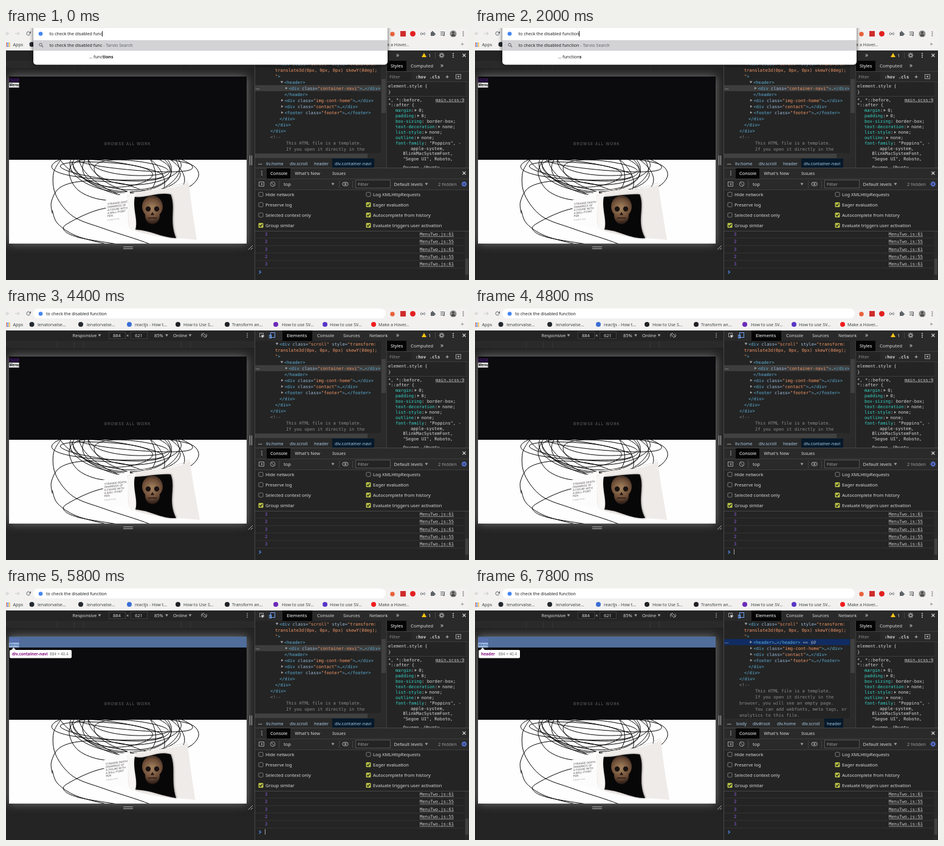
An HTML page with a canvas that plays this animation: 762 px wide and 415 px high, repeating every 8000 ms.

```html
<!DOCTYPE html>
<html lang="en">
<head>
<meta charset="utf-8">
<title>Browser session</title>
<style>
html, body { margin: 0; width: 100%; height: 100%; overflow: hidden; background: #242424; }
canvas { display: block; width: 762px; height: 415px; }
</style>
</head>
<body>
<canvas id="stage" width="762" height="415"></canvas>
<script>
const c = document.getElementById('stage').getContext('2d');
const UI = '"Noto Sans", "Open Sans", sans-serif';
const MONO = '"DejaVu Sans Mono", monospace';
const LOOP = 8000, STEP = 200;
const CLOSE = 4400, EXPAND = 6000, COLLAPSE = 7400;
const PALE = '#d8d8d8', GREY = '#9c9c9c', TAG = '#5db0d7';
const BACK = '#242424', BAR = '#2a2a2a', EDGE = '#3d3d3d', TRACK = '#2b2b2b', THUMB = '#414141';

// ---- helpers ----
function rect(x, y, w, h, color) { c.fillStyle = color; c.fillRect(x, y, w, h); }

function round(x, y, w, h, r, color) {
  c.fillStyle = color;
  c.beginPath(); c.roundRect(x, y, w, h, r); c.fill();
}

function frame(x, y, w, h, color) {
  c.strokeStyle = color; c.lineWidth = 1;
  c.strokeRect(x + .5, y + .5, w - 1, h - 1);
}

function disc(x, y, r, color) {
  c.fillStyle = color;
  c.beginPath(); c.arc(x, y, r, 0, 7); c.fill();
}

function ring(x, y, r, color, from = 0, to = 6.3) {
  c.strokeStyle = color; c.lineWidth = 1;
  c.beginPath(); c.arc(x, y, r, from, to); c.stroke();
}

function line(color, width, ...p) {
  c.strokeStyle = color; c.lineWidth = width;
  c.beginPath(); c.moveTo(p[0], p[1]);
  for (let i = 2; i < p.length; i += 2) c.lineTo(p[i], p[i + 1]);
  c.stroke();
}

function poly(color, ...p) {
  c.fillStyle = color;
  c.beginPath(); c.moveTo(p[0], p[1]);
  for (let i = 2; i < p.length; i += 2) c.lineTo(p[i], p[i + 1]);
  c.fill();
}

// y is the middle of the capital letters; returns the right end
function text(s, x, y, color = PALE, size = 7.5, font = UI, weight = 400) {
  c.font = `${weight} ${size}px ${font}`;
  c.fillStyle = color;
  c.fillText(s, x, y + size * .36);
  return x + c.measureText(s).width;
}

const mono = (s, x, y, color = PALE, weight) => text(s, x, y, color, 7.17, MONO, weight);

function link(s, x, y) {
  const end = mono(s, x, y, '#cccccc');
  rect(x, y + 3.6, end - x, .8, '#aaaaaa');
}

function down(x, y, color = GREY, r = 2.4) { poly(color, x - r, y - r * .7, x + r, y - r * .7, x, y + r * .9); }
function right(x, y, color = GREY, r = 2.2) { poly(color, x - r * .7, y - r, x + r * .9, y, x - r * .7, y + r); }
function dots(x, y, color) { for (const d of [-3, 0, 3]) disc(x, y + d, .9, color); }
function cross(x, y) {
  line(PALE, 1.1, x - 2.5, y - 2.5, x + 2.5, y + 2.5);
  line(PALE, 1.1, x + 2.5, y - 2.5, x - 2.5, y + 2.5);
}

function gear(x, y, color) {
  for (let i = 0; i < 8; i++) {
    const a = i * Math.PI / 4;
    line(color, 1.4, x, y, x + 4.5 * Math.cos(a), y + 4.5 * Math.sin(a));
  }
  disc(x, y, 3, color);
  disc(x, y, 1.6, BAR);
}

function spline(p) {
  const n = p.length / 2;
  const at = i => { const k = 2 * Math.max(0, Math.min(n - 1, i)); return [p[k], p[k + 1]]; };
  c.beginPath(); c.moveTo(p[0], p[1]);
  for (let i = 0; i < n - 1; i++) {
    const [a, b, d, e] = [at(i - 1), at(i), at(i + 1), at(i + 2)];
    c.bezierCurveTo(b[0] + (d[0] - a[0]) / 6, b[1] + (d[1] - a[1]) / 6,
      d[0] - (e[0] - b[0]) / 6, d[1] - (e[1] - b[1]) / 6, d[0], d[1]);
  }
  c.stroke();
}

// ---- previewed page ----
const sweeps = [
  [112,217, 104,240, 120,268, 160,283, 215,280, 262,262, 285,238, 280,217],
  [76,305, 75,285, 90,262, 130,252, 190,256, 235,270, 265,266, 300,262, 317,243, 305,225, 260,215],
  [76,300, 85,322, 115,342, 165,356],
  [205,290, 150,300, 105,320, 95,332, 120,345, 190,357],
  [90,217, 78,240, 82,275, 110,310, 160,330, 215,348, 240,357]
];

// one long pen line of drifting ovals, with a few wide sweeps
function scribble() {
  c.strokeStyle = '#000'; c.lineWidth = 1;
  c.beginPath();
  for (let a = 0; a < 72; a += .08) {
    const x = 192 + 20 * Math.sin(a * .17) + (78 + 20 * Math.sin(a * .29 + 1)) * Math.cos(a);
    const y = 229 + 10 * Math.sin(a * .23) + (31 + 18 * Math.sin(a * .37)) * Math.sin(a + .3);
    c.lineTo(x, y);
  }
  c.stroke();
  sweeps.forEach(spline);
}

// time, top right x and y, bottom right x, caption x, caption tilt
const poses = [
  [0, 301, 254, 314, 167, -.12],
  [2000, 302, 257, 316, 163, -.1],
  [3600, 309, 250, 327, 165, -.06],
  [4800, 301, 252, 316, 161, -.12],
  [5400, 297, 258, 309, 163, -.15],
  [6600, 304, 250, 319, 167, -.1],
  [7800, 306, 250, 320, 162, -.1]
];

function pose(t) {
  let i = 0;
  while (i < poses.length - 2 && t >= poses[i + 1][0]) i++;
  const a = poses[i], b = poses[i + 1];
  const u = Math.min(1, (t - a[0]) / (b[0] - a[0])), e = u * u * (3 - 2 * u);
  return a.map((v, k) => v + (b[k] - v) * e);
}

function poster(t) {
  const [, rx, ry, bx, tx, tilt] = pose(t);
  const w = 3 * Math.sin(t / 420);
  poly('#fdfcfc', tx - 4, 284, 204, 268, 204, 331, tx, 321);

  c.save();
  c.translate(tx, 290); c.rotate(tilt); c.transform(1, 0, -.12, 1, 0, 0);
  ['STRANGE DEATH', 'DRAWINGS OF', 'A FIGURE WITH', 'A BALL-POINT', 'PEN'].forEach(
    (s, i) => text(s, 0, i * 4.9, '#4b4849', 4.4, 'Inter, sans-serif'));
  text('A study in lines', 0, 26, '#8b8888', 2.8);
  c.restore();

  c.fillStyle = '#efebe9';
  c.beginPath(); c.moveTo(199, 276);
  c.bezierCurveTo(228, 262 + w, 268, 270 - w, rx, ry);
  c.bezierCurveTo(rx + 3, 284, bx - 5, 318, bx, 349);
  c.bezierCurveTo(286, 345, 238, 347, 203, 330);
  c.bezierCurveTo(198, 315, 203, 292, 199, 276);
  c.fill();
  poly('#f8f6f5', 200, 277, 213, 271, 214, 334, 203, 330);
  c.strokeStyle = '#d6d3d2'; c.lineWidth = .8;
  c.beginPath(); c.moveTo(180, 275);
  c.bezierCurveTo(218, 262 + w, 268, 268 - w, rx - 1, ry - 2); c.stroke();

  c.save();
  c.shadowColor = '#8d8784'; c.shadowBlur = 3; c.shadowOffsetX = 1;
  c.fillStyle = '#080708';
  c.beginPath(); c.moveTo(212, 278);
  c.bezierCurveTo(229, 281 + w, 248, 270 - w, 271, 274);
  c.bezierCurveTo(280, 296, 268 + w, 318, 280, 346);
  c.bezierCurveTo(255, 345 - w, 238, 333, 213, 332);
  c.bezierCurveTo(218, 317, 208, 298, 212, 278);
  c.fill();
  c.restore();

  const g = c.createRadialGradient(240, 296, 3, 240, 298, 24);
  g.addColorStop(0, '#9a7a58'); g.addColorStop(.6, '#6c4c36'); g.addColorStop(1, '#2b1d17');
  c.fillStyle = g;
  c.beginPath(); c.ellipse(241, 294, 17, 18, 0, 0, 7); c.fill();
  c.beginPath(); c.ellipse(241, 309, 12, 14, 0, 0, 7); c.fill();
  disc(234, 298, 4.2, '#1b1211'); disc(248, 298, 4.2, '#1b1211');
  poly('#231614', 241, 303, 244, 308, 238, 308);
  rect(234, 312, 14, 1.5, '#2a1b16');
}

function tip(x, y, w, name, size, nameX, sizeX) {
  c.save();
  c.shadowColor = '#0006'; c.shadowBlur = 3;
  round(x, y, w, 13.5, 2, '#fff');
  c.restore();
  text(name, nameX, y + 7, '#881280', 6.5, UI, 700);
  text(size, sizeX, y + 7, '#6b6b6b', 6.4);
}

function page(t) {
  rect(0, 37, 410, 378, BACK);
  rect(0, 54, 410, 12, BAR);
  for (const x of [84, 112, 127, 288, 303]) rect(x, 55, 1, 11, '#363636');
  rect(0, 66, 410, 1, '#1d1d1d');
  c.save();
  c.shadowColor = '#767676'; c.shadowBlur = 14;
  rect(5, 80, 391, 275, '#0b0a0c');
  c.restore();

  c.save();
  c.beginPath(); c.rect(5, 80, 391, 275); c.clip();
  rect(5, 80, 391, 137, '#0b0a0c');
  rect(5, 217, 391, 138, '#fefefe');
  text('Home', 5, 84.5, '#5a1e96', 6.4, '"Liberation Sans", Arial, sans-serif');
  rect(5, 87.5, 16, .8, '#5a1e96');
  rect(5, 90, 16.5, 8, '#f5f5f5');
  text('Menu', 5.5, 94, '#111', 6.3, '"Liberation Sans", Arial, sans-serif', 700);
  c.letterSpacing = '1px';
  text('BROWSE ALL WORK', 162, 191, '#838183', 6.4, 'Inter, sans-serif', 300);
  c.letterSpacing = '0px';
  c.save();
  c.beginPath(); c.rect(5, 217, 391, 138); c.clip();
  scribble();
  poster(t);
  c.restore();
  const shade = 'rgba(117,164,232,.65)';
  if (t >= 5200 && t < 5800) rect(5, 80, 391, 275, shade);
  else if (t >= 5800) rect(5, 80, 391, 18, shade);
  c.restore();

  if (t >= 5200 && t < 5800) tip(5, 342, 87, 'div.scroll', '884 × 1899.99', 11, 44);
  else if (t >= 5800) {
    poly('#fff', 8, 103, 12.5, 98, 17, 103);
    if (t < COLLAPSE) tip(6, 102, 102, 'div.container-navi', '884 × 40.4', 10, 72);
    else tip(6, 102, 68, 'header', '884 × 40.4', 10, 38.5);
  }

  for (const d of [-1.5, 1.5]) {
    line('#b5b5b5', 1, 403 + d, 210, 403 + d, 226);
    line('#b5b5b5', 1, 193, 362 + d, 209, 362 + d);
  }
  line('#b5b5b5', 1, 399, 365, 406, 358);
  line('#b5b5b5', 1, 403, 365, 406, 362);
}

function deviceBar() {
  rect(0, 37, 410, 17, BACK);
  text('Responsive', 109.5, 45); down(154, 45);
  for (const [n, x] of [['884', 169], ['621', 205]]) {
    rect(x, 39, 28, 12, '#202020'); frame(x, 39, 28, 12, EDGE);
    text(n, x + 7, 45);
  }
  text('×', 198, 45);
  text('85%', 244, 45); down(264.5, 45);
  text('Online', 275, 45); down(303, 45);
  c.save(); c.translate(326, 45); c.rotate(-.75);
  frame(-2, -4, 4, 8, GREY);
  c.restore();
  ring(326, 45, 4.5, GREY, -.6, .8); ring(326, 45, 4.5, GREY, 2.5, 3.9);
  dots(397, 45, GREY);
}

// ---- inspector ----
function tag(s, x, y) {
  for (const part of s.split(/("[^">]*"?| [a-z]+=|…)/)) {
    const color = part[0] === '"' ? '#f29766' : part[0] === ' ' ? '#9bbbdc' : part === '…' ? GREY : TAG;
    x = mono(part, x, y, color);
  }
  return x;
}

// text, x, arrow: 1 open, 2 closed
const top3 = [['<div class="scroll" style="transform:', 450, 1],
  ['translate3d(0px, 0px, 0px) skewY(0deg);', 443], ['">', 443]];
const rest = [['<div class="img-cont-home">…</div>', 458.5, 2], ['<div class="contact">…</div>', 458.5, 2],
  ['<footer class="footer">…</footer>', 458.5, 2], ['</div>', 450], ['</div>', 443], ['</div>', 435], ['<!--', 435],
  ['This HTML file is a template.', 461], ['If you open it directly in the', 461],
  ['browser, you will see an empty page.', 435], ['You can add webfonts, meta tags, or', 461],
  ['analytics to this file.', 435], ['The build step will place the', 461]];
const open = ['<header>', 458, 1], shut = ['</header>', 458];
const trees = [
  [...top3, open, ['<div class="container-navi">…</div>', 465.5, 2], shut, ...rest],
  [...top3, open, ['<div class="container-navi">', 465.5, 1], ['<div class="wrapper-navi">…</div>', 474, 2],
    ['</div>', 467], shut, ...rest],
  [...top3, ['<header>…</header>', 458, 2], ...rest]
];
const crumbs = [['liv.home', 428], ['div.scroll', 467], ['header', 507], ['div.container-navi', 541]];
const rootCrumbs = [['body', 430], ['div#root', 457], ['div.home', 497], ['div.scroll', 538], ['header', 579]];

function elements(t) {
  const mode = t < EXPAND ? 0 : t < COLLAPSE ? 1 : 2;
  const picked = mode === 2 ? 3 : 4;
  const rowY = i => 59 + 10.02 * i;
  rect(410, 54, 217, 161, BACK);
  c.save();
  c.beginPath(); c.rect(410, 54, 207, 161); c.clip();
  if (t >= 5200 && t < 5800) rect(410, 54, 207, 29, '#1f2b3b');
  rect(410, rowY(picked) - 5, 207, 10, mode ? '#102c63' : '#3d3d3d');
  text('…', 411, rowY(picked) - 1, PALE, 8);
  trees[mode].forEach(([s, x, arrow], i) => {
    const y = rowY(i);
    if (y > 218) return;
    if (arrow === 1) down(x - 4, y); else if (arrow) right(x - 4, y);
    let end = x;
    if (i === 1) mono(s, x, y, '#f29766');
    else if (s[0] === '<' && s !== '<!--' || i === 2) end = tag(s, x, y);
    else mono(s, x, y, '#8b8b8b');
    if (mode && i === picked) text('== $0', end + 4, y, '#a9b4c4', 7.17, MONO, 'italic 400');
  });
  if (mode === 1) line('#4c5868', 1, 462.5, 104, 462.5, 124);
  if (mode < 2) { rect(410, 206, 207, 9, TRACK); rect(410, 207, 185, 7, THUMB); }
  c.restore();
  rect(617, 54, 9, 161, TRACK);
  rect(618, 84, 7, 56, THUMB);

  rect(410, 215, 217, 15, BAR);
  text('...', 415, 222, PALE, 8, UI, 700);
  const list = mode === 2 ? rootCrumbs : crumbs;
  const last = list[list.length - 1];
  rect(last[1] - 4, 215, 610 - last[1], 15, '#06192a');
  for (const [s, x] of list) text(s, x, 223, '#a8cbe6', 7.2);
}

function devtoolsTabs() {
  rect(410, 37, 352, 17, BAR);
  frame(417, 41, 7, 7, GREY);
  poly(PALE, 420, 44, 426, 46, 423, 47, 422, 50);
  frame(435, 40, 8, 9, '#6ea0f5'); frame(433, 44, 4, 6, '#6ea0f5');
  rect(455, 37, 49, 17, '#050505');
  text('Elements', 462, 45, '#fff', 7.7);
  text('Console', 512, 45);
  text('Sources', 555, 45);
  text('Network', 598, 45);
  text('»', 642, 44, PALE, 10);
  poly('#f5c518', 688, 41, 692, 48, 684, 48);
  text('1', 695, 45);
  rect(706, 40, 1, 10, '#474747');
  gear(717, 45, GREY);
  dots(736, 45, PALE);
  cross(754, 45);
}

function styles() {
  rect(626, 54, 136, 177, BACK);
  rect(626, 54, 136, 34, BAR);
  rect(627, 54, 32, 17, '#050505');
  rect(626, 71, 136, 1, EDGE);
  text('Styles', 633, 62, '#fff');
  text('Computed', 666, 62);
  text('»', 715, 61, PALE, 10);
  rect(627, 73, 40, 14, BACK);
  text('Filter', 631, 80, '#8c8c8c');
  mono(':hov', 674, 80, PALE, 700);
  mono('.cls', 697, 80, PALE, 700);
  text('+', 723, 80, PALE, 11);
  frame(740, 76, 9, 8, GREY);
  poly(GREY, 746, 78, 746, 82, 742, 80);
  rect(626, 88, 136, 1, EDGE);

  mono('element.style {', 629, 95);
  mono('}', 629, 105);
  rect(626, 112, 130, 1, EDGE);
  mono('*, *::before,', 629, 118);
  link('main.scss:9', 707, 118);
  mono('*::after {', 629, 126.5);
  c.save();
  c.beginPath(); c.rect(626, 110, 130, 120); c.clip();
  const rules = [['margin', '0;', 1], ['padding', '0;', 1], ['box-sizing', 'border-box;'],
    ['text-decoration', 'none;', 1], ['list-style', 'none;', 1], ['outline', 'none;', 1],
    ['font-family', '"Poppins", -']];
  rules.forEach(([name, value, arrow], i) => {
    const y = 135.5 + 9.05 * i;
    let x = mono(name, 641, y, '#35d4c7');
    x = mono(':', x, y);
    if (arrow) right(x + 3, y);
    mono(value, x + (arrow ? 8 : 4.3), y);
  });
  mono('apple-system,', 666, 198.5);
  mono('BlinkMacSystemFont,', 653.5, 206.8);
  mono('"Segoe UI", Roboto,', 653.5, 215.3);
  mono('Oxygen, Ubuntu,', 653.5, 229);
  c.restore();
  rect(756, 89, 6, 141, TRACK);
  rect(626, 54, 1, 176, EDGE);
}

function check(label, x, y, on) {
  if (on) {
    round(x, y - 4, 8, 8, 1.5, '#b6bf46');
    line('#202020', 1.3, x + 1.7, y, x + 3.3, y + 1.9, x + 6.4, y - 2);
  } else {
    c.strokeStyle = '#7c7c7c'; c.lineWidth = 1;
    c.beginPath(); c.roundRect(x + .5, y - 3.5, 7, 7, 1.5); c.stroke();
  }
  text(label, x + 11.5, y);
}

function consolePane(t) {
  rect(410, 230, 352, 185, BACK);
  rect(410, 230, 352, 36, BAR);
  rect(410, 230, 352, 1, '#484848');
  rect(410, 248, 352, 1, EDGE);
  dots(421, 239, GREY);
  rect(429, 231, 39, 17, '#050505');
  text('Console', 435, 239, '#fff');
  text('What\'s New', 475.5, 239);
  text('Issues', 537, 239);
  cross(754, 239);

  frame(416, 253, 9, 8, GREY);
  poly(GREY, 420, 255, 423, 257, 420, 259);
  ring(439, 257, 3.8, GREY); line(GREY, 1, 436.3, 254.3, 441.7, 259.7);
  for (const x of [449, 548, 570]) rect(x, 251, 1, 13, '#424242');
  text('top', 457, 257); down(538, 257);
  c.strokeStyle = GREY; c.lineWidth = 1.1;
  c.beginPath(); c.ellipse(558.5, 257, 4.6, 2.9, 0, 0, 7); c.stroke();
  disc(558.5, 257, 1.6, GREY);
  rect(575, 250, 58, 14, BACK); frame(575, 250, 58, 14, '#545454');
  text('Filter', 579, 257, '#a0a0a0');
  text('Default levels', 638.5, 257); down(692, 257);
  text('2 hidden', 711, 257, GREY);
  gear(754, 257, '#5a7df0');
  rect(410, 266, 352, 1, EDGE);

  ['Hide network', 'Preserve log', 'Selected context only', 'Group similar'].forEach(
    (s, i) => check(s, 415.5, 274 + 17 * i, i === 3));
  ['Log XMLHttpRequests', 'Eager evaluation', 'Autocomplete from history', 'Evaluate triggers user activation'].forEach(
    (s, i) => check(s, 592.5, 274 + 17 * i, i > 0));

  rect(410, 334, 352, 1, '#464646');
  for (let i = 0; i < 5; i++) {
    const y = 339.5 + 12.3 * i, odd = i % 2;
    mono(odd ? '2' : '3', 426, y, '#9360e8');
    link(odd ? 'MenuTwo.js:55' : 'MenuTwo.js:61', 681, y);
    rect(410, y + 6, 345, 1, '#343434');
  }
  line('#4f8ff0', 1.2, 416.5, 399.5, 419.5, 402, 416.5, 404.5);
  if (t >= CLOSE && t < EXPAND && (t - 4450 + LOOP) % 1000 < 500) rect(426, 397, 1, 9, '#a8a8a8');
  rect(755, 335, 7, 80, TRACK);
  rect(756, 380, 5, 26, THUMB);
  rect(409, 37, 1, 378, '#484848');
}

// ---- browser chrome ----
const bookmarks = [
  ['lenatorvalse...', 42.5, 52, '#24292e'], ['lenatorvalse...', 123, 133, '#24292e'],
  ['reactjs - How t...', 203, 212, '#3b6fd4'], ['How to Use S...', 283, 292, '#202124'],
  ['Transform an...', 364, 372, '#202124'], ['How to use SV...', 444, 454, '#6a2bb8'],
  ['How to use SV...', 525, 533, '#5a35c8'], ['Make a Hover…', 605, 613, '#f01c1c']];

function chrome() {
  rect(0, 0, 762, 37, '#f2f1f0');
  line('#c4c6c9', 1, 6, 9, 0, 9, 3, 6); line('#c4c6c9', 1, 0, 9, 3, 12);
  line('#c4c6c9', 1, 15, 9, 22, 9, 19, 6); line('#c4c6c9', 1, 22, 9, 19, 12);
  ring(37, 9, 3, '#5f6368', .3, 5.4);
  poly('#5f6368', 41, 5, 41, 9, 37.5, 9);
  round(45, 1, 580, 16, 8, '#fff');
  disc(57, 9.5, 3.3, '#4285f4');
  text('to check the disabled function', 66, 9.5, '#202124', 7.1);

  disc(636, 10, 3.7, '#e8623a');
  rect(649, 5, 9, 9, '#cf2c2c');
  disc(669.5, 9.5, 4.5, '#e32020');
  disc(686, 9.5, 1.3, '#5f6368');
  ring(686, 9.5, 3.4, '#5f6368', -.8, .8); ring(686, 9.5, 3.4, '#5f6368', 2.3, 4);
  rect(699, 7, 6, 6, '#5f6368'); disc(702, 6.5, 1.5, '#5f6368'); disc(705.5, 10, 1.5, '#5f6368');
  for (const y of [6, 8.5, 11]) rect(715, y, y === 11 ? 4 : 6, 1, '#5f6368');
  rect(721, 6, 1, 6, '#5f6368'); disc(720.5, 12, 1.3, '#5f6368');
  disc(736, 9.5, 5.5, '#8c8c8c');
  disc(736, 7.5, 2, '#4a4a4a');
  c.fillStyle = '#4a4a4a';
  c.beginPath(); c.arc(736, 13.5, 3.5, Math.PI, 0); c.fill();
  dots(752.5, 9.5, '#5f6368');

  const hues = ['#e34a3c', '#4285f4', '#f2b01e'];
  for (let i = 0; i < 9; i++) rect(i % 3 * 2.6 - .5, 24 + Math.floor(i / 3) * 2.6, 1.9, 1.9, hues[i % 3]);
  text('Apps', 11.5, 27, '#3c4043', 7.1);
  for (const [s, x, tx, color] of bookmarks) {
    disc(x, 27, 4, color);
    text(s, tx, 27, '#3c4043', 7.1);
  }
  text('»', 749, 26, '#5f6368', 8);
}

function suggestions(t) {
  const n = Math.min(30, 26 + Math.max(0, t / STEP - 1));
  const typed = 'to check the disabled function'.slice(0, n);
  c.save();
  c.shadowColor = '#000a'; c.shadowBlur = 6; c.shadowOffsetY = 1;
  round(45, -8, 583, 68.5, 5, '#fff');
  c.restore();
  disc(57, 9.5, 3.3, '#4285f4');
  const end = text(typed, 71.5, 9.5, '#202124', 7.1);
  if (t < 1000 || (t - 1000) % 1000 < 500) rect(Math.round(end), 5, 1, 9, '#202124');
  rect(45, 20, 583, 17.5, '#d3d3d6');
  ring(57, 27.5, 2.3, '#5f6368'); line('#5f6368', 1.1, 58.7, 29.2, 61, 31.5);
  const x = text(typed, 71.5, 28.5, '#202124', 7.1);
  text(' - Tarvio Search', x, 28.5, '#5f6368', 7.1);
  const word = typed.slice(22);
  const mid = text('... ' + word, 136.5, 47, '#202124', 7.1);
  text('functions'.slice(word.length), mid, 47, '#202124', 7.1, UI, 700);
}

function draw(now) {
  const t = Math.floor(now % LOOP / STEP) * STEP;
  page(t);
  deviceBar();
  elements(t);
  devtoolsTabs();
  styles();
  consolePane(t);
  chrome();
  if (t < CLOSE) suggestions(t);
}

function tick() {
  draw(performance.now());
  requestAnimationFrame(tick);
}
tick();
</script>
</body>
</html>
```
